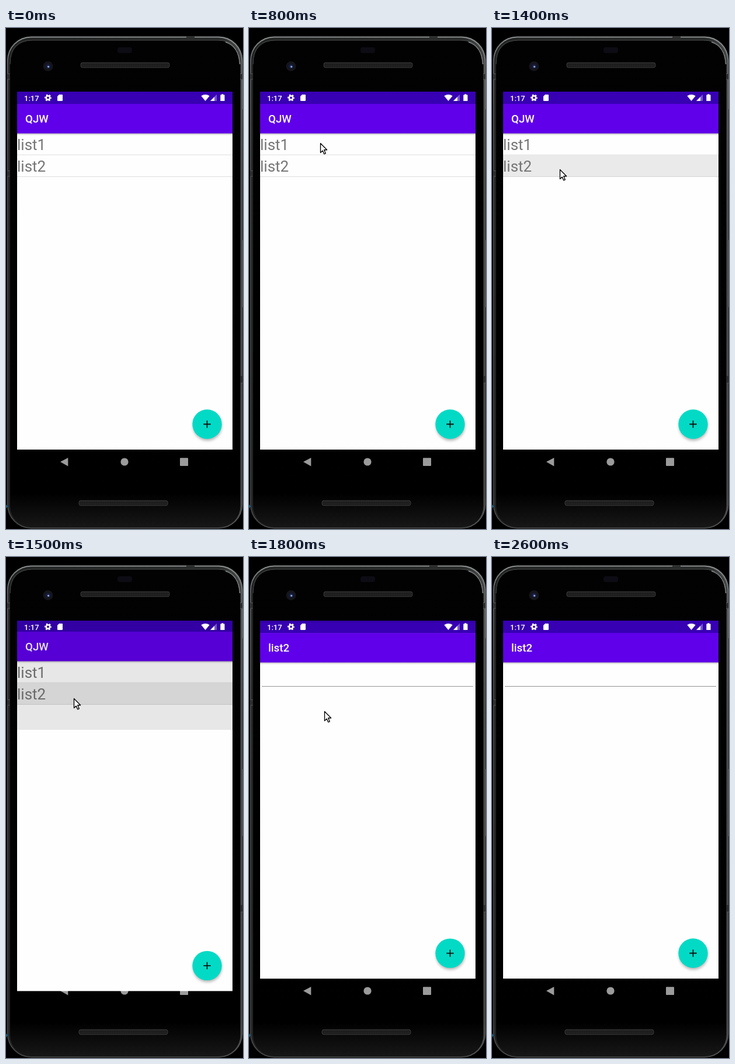
These frames come from a looping animation (406x858 px, 2.7 s). An HTML page:

```html
<!DOCTYPE html>
<html lang="en">
<head>
<meta charset="utf-8">
<title>List app demo</title>
<style>
html, body { margin: 0; width: 100%; height: 100%; overflow: hidden; background: #000; }
svg { display: block; width: 406px; height: 858px; font-family: Roboto, sans-serif; }
.title { font-size: 18.7px; font-weight: 500; fill: #fff; }
.row { font-size: 26px; fill: #757575; }
.clock { font-size: 13px; font-weight: 500; fill: #fff; }
</style>
</head>
<body>
<svg viewBox="0 0 406 858" xmlns="http://www.w3.org/2000/svg">
  <defs>
    <linearGradient id="rim" x1="0" y1="0" x2="0" y2="1">
      <stop offset="0" stop-color="#8a8e8e"/>
      <stop offset=".06" stop-color="#6a6d6d"/>
      <stop offset=".3" stop-color="#505252"/>
      <stop offset=".93" stop-color="#444545"/>
      <stop offset="1" stop-color="#5c5d5d"/>
    </linearGradient>
    <linearGradient id="bevel" x1="0" y1="0" x2="1" y2="0">
      <stop offset="0" stop-color="#222323"/>
      <stop offset=".9" stop-color="#262727"/>
      <stop offset="1" stop-color="#474949"/>
    </linearGradient>
    <linearGradient id="glass" x1="0" y1="0" x2="0" y2="1">
      <stop offset="0" stop-color="#020202"/>
      <stop offset=".93" stop-color="#000"/>
      <stop offset="1" stop-color="#171717"/>
    </linearGradient>
    <linearGradient id="drop" x1="0" y1="0" x2="0" y2="1">
      <stop offset="0" stop-color="#000" stop-opacity=".28"/>
      <stop offset="1" stop-color="#000" stop-opacity="0"/>
    </linearGradient>
    <radialGradient id="lens">
      <stop offset="0" stop-color="#2c3a72"/>
      <stop offset=".45" stop-color="#161d3a"/>
      <stop offset="1" stop-color="#121217"/>
    </radialGradient>
    <pattern id="mesh" width="3" height="3" patternUnits="userSpaceOnUse">
      <rect width="3" height="3" fill="#252525"/>
      <rect width="1.5" height="1.5" fill="#0c0c0c"/>
    </pattern>
    <filter id="blur" x="-30%" y="-30%" width="160%" height="160%"><feGaussianBlur stdDeviation="2.5"/></filter>
    <clipPath id="below"><rect x="19" y="109" width="369" height="660"/></clipPath>
    <clipPath id="reveal"><rect id="cut" x="19" y="109" width="369" height="660"/></clipPath>
    <clipPath id="row2"><rect x="19" y="218" width="369" height="36.5"/></clipPath>
    <g id="bars">
      <rect x="19" y="109" width="369" height="613" fill="#fefefe"/>
      <rect x="19" y="180" width="369" height="4" fill="url(#drop)"/>
      <rect x="19" y="109" width="369" height="21.5" fill="#3700b3"/>
      <rect x="19" y="130" width="369" height="50.5" fill="#6000ea"/>
    </g>
    <g id="fab">
      <circle cx="345" cy="682" r="24.5" fill="#000" opacity=".3" filter="url(#blur)"/>
      <circle cx="344.5" cy="678.5" r="25.2" fill="#03dac5"/>
      <path d="M338.3 678.5h12.4M344.5 672.3v12.4" stroke="#0a1413" stroke-width="1.8"/>
    </g>
    <g id="speaker">
      <rect x=".5" y=".5" width="152" height="8.5" rx="3" fill="url(#mesh)" stroke="#3a3a3a"/>
    </g>
  </defs>

  <rect width="406" height="858" fill="#000"/>
  <path d="M404.5 363h1.5v115h-1.5zM404.5 79h1.5v60h-1.5z" fill="#555"/>
  <rect x="2" y="14.5" width="403.5" height="842.5" rx="41" fill="url(#rim)"/>
  <rect x="3.5" y="16.5" width="400" height="839.5" rx="39.5" fill="url(#bevel)"/>
  <rect x="7" y="21" width="394.5" height="834" rx="36" fill="url(#glass)"/>
  <path d="M7 62Q7 21 46 21H362Q401.5 21 401.5 62" fill="none" stroke="#4b4e4e"/>
  <path d="M376 24Q399 31 400.5 62" fill="none" stroke="#8d9191" stroke-width="1.4"/>
  <path d="M2.5 78h4v10h-4zM2.5 244h4v10h-4zM401 78h4v10h-4zM402 596h4v12h-4zM309 14.5h14v4h-14z" fill="#2c2d2d"/>
  <path d="M2.5 78.5h4M2.5 88h4M2.5 244.5h4M2.5 254h4M401 78.5h4M401 88h4M402 608h4" stroke="#555"/>
  <path d="M0 816l3 3-3 4z" fill="#155c86"/>

  <rect x="191" y="33" width="25" height="10" rx="4" fill="#0d0c14"/>
  <circle cx="72" cy="65.5" r="8.5" fill="#15151a"/>
  <circle cx="72" cy="65.5" r="6" fill="url(#lens)"/>
  <circle cx="72.7" cy="66.3" r="1.6" fill="#8fa6e0"/>
  <use href="#speaker" x="127.5" y="58.8"/>
  <use href="#speaker" x="124.5" y="808.8"/>

  <g fill="#9b9b9b">
    <path d="M93 743L106.3 736v14.4z"/>
    <circle cx="203" cy="743" r="6.6"/>
    <rect x="298" y="736.3" width="14" height="13.7" rx="1"/>
  </g>

  <g clip-path="url(#below)">
    <g id="home">
      <use href="#bars"/>
      <text class="title" x="33" y="162.3">QJW</text>
      <text class="row" x="19" y="209">list1</text>
      <path d="M19 217.2H388M19 254.5H388" stroke="#dedede"/>
      <g clip-path="url(#row2)"><circle id="ripple" cx="116" cy="242" r="0" fill="#000" opacity=".08"/></g>
      <text class="row" x="19" y="246">list2</text>
      <use href="#fab"/>
      <rect id="dim" x="19" y="109" width="369" height="613" opacity="0"/>
    </g>
  </g>
  <g clip-path="url(#reveal)">
    <g id="detail">
      <use href="#bars"/>
      <text class="title" x="33" y="162.3">list2</text>
      <path d="M22 221.5H384" stroke="#919191"/>
      <use href="#fab"/>
    </g>
  </g>

  <text class="clock" x="31" y="124.6">1:17</text>
  <g fill="#fff">
    <circle cx="72" cy="119.5" r="3.2" fill="none" stroke="#fff" stroke-width="2.6"/>
    <circle cx="72" cy="119.5" r="5" fill="none" stroke="#fff" stroke-width="2" stroke-dasharray="2.7 2.536" stroke-dashoffset="1.35"/>
    <path d="M91 114h5a1 1 0 0 1 1 1v9a1 1 0 0 1-1 1h-7a1 1 0 0 1-1-1v-7z"/>
    <path d="M334.3 116.3Q341.5 111.5 348.7 116.3L341.5 125z"/>
    <path d="M361 113.8V125H350z" opacity=".35"/>
    <path d="M357 118V125H350z"/>
    <path d="M369.3 113.2h3v1.2h2.2v10.6h-7.2v-10.6h2z"/>
  </g>

  <path id="mouse" d="M.5 .5V16.5L4.2 13.1 6.7 18.8 9.2 17.8 6.8 11.7H11.6z" fill="#fff" stroke="#000" stroke-width="1.35" stroke-linejoin="round"/>
</svg>
<script>
const LOOP = 2700, STEP = 100, OPEN = 1400, OPEN_MS = 440, H = 640;
const el = id => document.getElementById(id);
const clamp = v => Math.max(0, Math.min(1, v));
const move = (id, x, y) => el(id).setAttribute('transform', `translate(${x.toFixed(2)} ${y.toFixed(2)})`);

// time, x, y of the pointer tip
const path = [[100, 400, 715], [200, 362, 676], [300, 252, 586], [400, 164, 337], [500, 142, 190],
  [600, 126, 194], [800, 122, 197], [900, 122, 199], [1100, 117, 234], [1200, 116, 242], [1600, 116, 242],
  [1700, 118, 246], [1800, 129, 264], [1900, 156, 296], [2000, 248, 403], [2100, 334, 545], [2200, 393, 668]];

function pointer(t) {
  const i = path.findIndex(p => p[0] >= t);
  if (t < path[0][0] || i < 0) return null;
  const b = path[i], a = path[Math.max(0, i - 1)];
  const k = b[0] === a[0] ? 0 : (t - a[0]) / (b[0] - a[0]);
  return [a[1] + (b[1] - a[1]) * k, a[2] + (b[2] - a[2]) * k];
}

// y of a cubic curve at x, for control points p
function curve(p, x) {
  const at = (s, j) => (1 - s) ** 3 * p[0][j] + 3 * s * (1 - s) ** 2 * p[1][j]
    + 3 * s * s * (1 - s) * p[2][j] + s ** 3 * p[3][j];
  let lo = 0, hi = 1;
  for (let n = 0; n < 30; n++) {
    const mid = (lo + hi) / 2;
    if (at(mid, 0) < x) lo = mid; else hi = mid;
  }
  return at(lo, 1);
}
const slide = x => curve([[0, 0], [.4, 0], [.2, 1], [1, 1]], x);
const unveil = x => x < 1 / 6
  ? curve([[0, 0], [.05, 0], [.1333, .06], [1 / 6, .4]], x)
  : curve([[1 / 6, .4], [.183, .84], [.275, .97], [1, 1]], x);

function draw(t) {
  const x = clamp((t - OPEN) / OPEN_MS), p = slide(x);
  const drop = .041 * H * (1 - p), top = drop + H * (1 - unveil(x));
  move('home', 0, -Math.round(.021 * H * p));
  move('detail', 0, drop);
  el('dim').setAttribute('opacity', .09 * clamp(x * 4.5));
  el('cut').setAttribute('y', 109 + Math.round(top));
  el('detail').style.display = x > 0 ? '' : 'none';
  el('ripple').setAttribute('r', t < 1300 ? 0 : 90 + 2.4 * (t - 1300));

  const tip = pointer(t);
  el('mouse').style.display = tip ? '' : 'none';
  if (tip) move('mouse', ...tip);
}

function tick() {
  const t = performance.now() % LOOP;
  draw(Math.floor(t / STEP) * STEP);
  requestAnimationFrame(tick);
}
tick();
</script>
</body>
</html>
```
